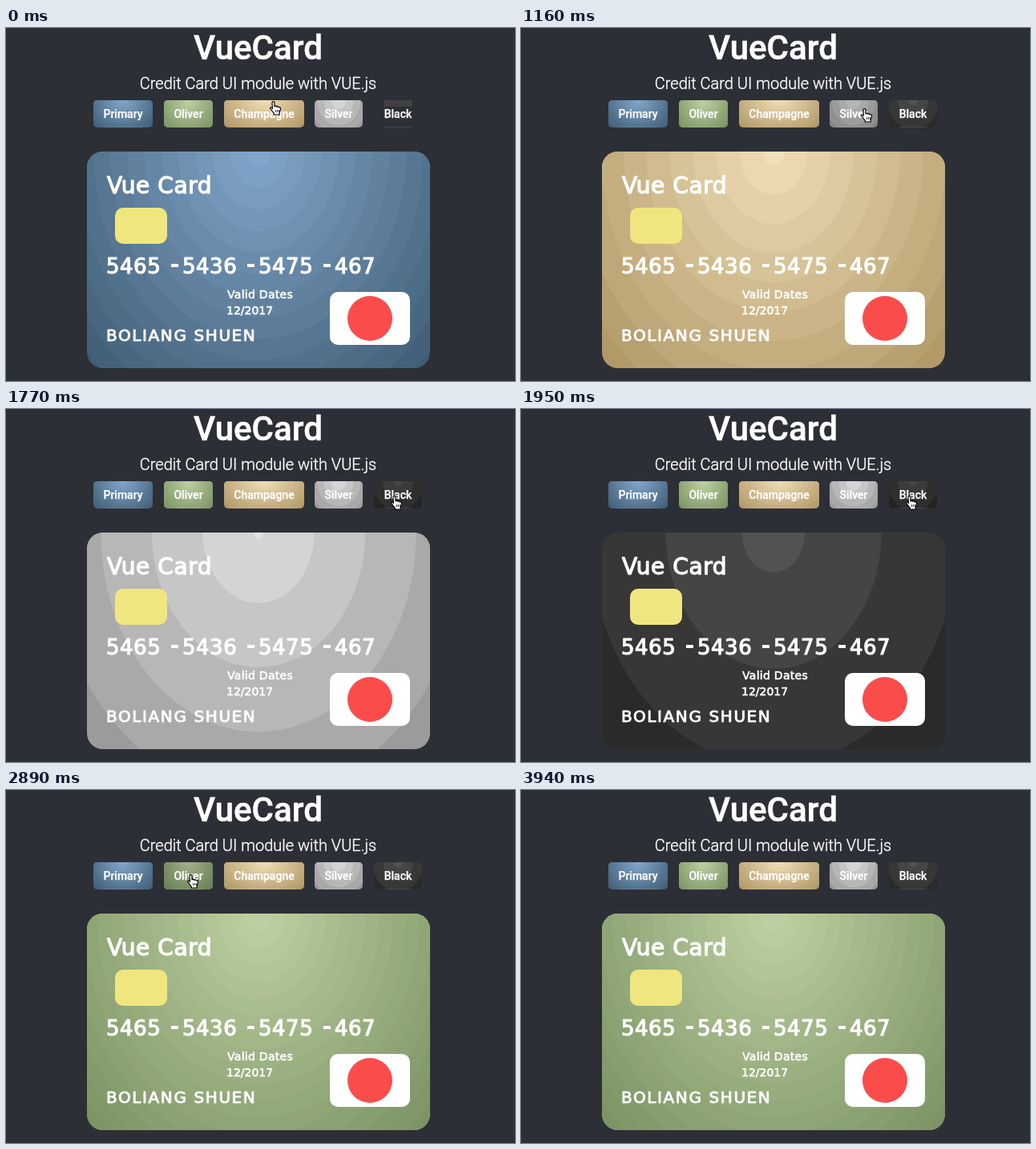
Animation, 635 px wide and 440 px high, one loop 4200 ms. Source, as an HTML page with a canvas:

```html
<!DOCTYPE html>
<html lang="en">
<head>
<meta charset="utf-8">
<title>VueCard</title>
<style>
  html, body { margin: 0; width: 100%; height: 100%; overflow: hidden; background: #2d2f36; }
  canvas { display: block; }
</style>
</head>
<body>
<canvas id="stage" width="635" height="440"></canvas>
<script>
const ctx = document.getElementById('stage').getContext('2d');
const LOOP = 4200;
const TICK = LOOP / 48;
const BG = '#2d2f36';
const UI = 'Roboto, sans-serif';
const CARD = '"DejaVu Sans", sans-serif';

// Card finishes: colours of a stepped radial gradient, first band edge and band width
const themes = {
  Primary:   { from: '#82a6cb', to: '#3f5c73', off: .05,  step: .07 },
  Oliver:    { from: '#bccfa1', to: '#789061', off: .06,  step: .055 },
  Champagne: { from: '#f1dfb8', to: '#b19968', off: .045, step: .0955 },
  Silver:    { from: '#e2e2e2', to: '#9b9b9b', off: .02,  step: .21 },
  Black:     { from: '#525252', to: '#2a2a2a', off: .13,  step: .315 }
};

// Pointer moves: when, where to, and how far the path arcs upwards
const home = { x: 329, y: 91 };
const moves = [
  { start: 0,    end: 175,  x: 316, y: 107, lift: 0 },
  { start: 525,  end: 1050, x: 424, y: 100, lift: 3 },
  { start: 1140, end: 1750, x: 480, y: 108, lift: 18 },
  { start: 1925, end: 2800, x: 226, y: 105, lift: 56 },
  { start: 3065, end: 3880, x: 615, y: 458, lift: 20 }
];

const picks = [
  { at: 0, name: 'Primary' },
  { at: 350, name: 'Champagne' },
  { at: 1225, name: 'Silver' },
  { at: 1925, name: 'Black' },
  { at: 2800, name: 'Oliver' }
];

const hand = new Path2D('M3 2.2Q3 .6 4.5 .6T6 2.2V7Q6.5 6 7.7 6.2T8.7 7.3Q9.4 6.6 10.4 6.9T11.3 8' +
  'Q12 7.6 12.9 8T13.5 9.8Q13.4 12.5 12.2 14.2V17H5.2V15.2Q3.5 13.2 2.3 11.5T.6 9.2Q.5 8 1.6 8T3.4 9.6Z');

const mix = (a, b, p) => a + (b - a) * p;
const ease = p => p * p * (3 - 2 * p);
const rgb = hex => [1, 3, 5].map(i => parseInt(hex.slice(i, i + 2), 16));

function pointerAt(t) {
  let { x, y } = home;
  for (const m of moves) {
    if (t <= m.start) break;
    const p = ease(Math.min(1, (t - m.start) / (m.end - m.start)));
    x = mix(x, m.x, p);
    y = mix(y, m.y, p) - m.lift * Math.sin(Math.PI * p);
  }
  return { x, y };
}

function box(x, y, w, h, r, fill) {
  ctx.beginPath();
  ctx.roundRect(x, y, w, h, r);
  ctx.fillStyle = fill;
  ctx.fill();
}

// Gradient spreads from the top centre to the far corners
function bands(x, y, w, h, r, { from, to, off, step }) {
  const n = Math.ceil((1 - off) / step);
  const end = rgb(to);
  const shade = i => `rgb(${rgb(from).map((c, j) => Math.round(mix(c, end[j], i / n)))})`;
  ctx.save();
  box(x, y, w, h, r, shade(n));
  ctx.clip();
  for (let i = n - 1; i >= 0; i--) {
    const t = (off + i * step) * Math.SQRT2;
    ctx.beginPath();
    ctx.ellipse(x + w / 2, y, t * w / 2, t * h, 0, 0, Math.PI * 2);
    ctx.fillStyle = shade(i);
    ctx.fill();
  }
  ctx.restore();
}

function text(str, x, y, font, weight, align = 'center') {
  ctx.font = font;
  ctx.textAlign = align;
  ctx.fillStyle = ctx.strokeStyle = '#fff';
  ctx.lineWidth = weight;
  ctx.lineJoin = 'round';
  ctx.fillText(str, x, y);
  ctx.strokeText(str, x, y);
}

function cardText(str, x, y, size, spacing = .02) {
  ctx.letterSpacing = size * spacing + 'px';
  text(str, x, y, `${size}px ${CARD}`, size * .045, 'left');
  ctx.letterSpacing = '0px';
}

function drawButtons(t, pointer) {
  const y = 90, h = 34, gap = 13.75, font = `500 14px ${UI}`;
  const px = pointer.x + 4.5, py = pointer.y;
  let left = 109;
  for (const [label, theme] of Object.entries(themes)) {
    ctx.font = font;
    const x = Math.round(left), w = Math.round(ctx.measureText(label).width + 25);
    if (label === 'Black' && t < picks[1].at) {
      // Not fully painted until the first click
      box(x + 12, y, w - 24, 8, 0, '#414141');
    } else {
      bands(x, y, w, h, 5, theme);
      const hover = px > x && px < x + w && py > y + 2 && py < y + h;
      if (hover) box(x, y, w, h, 5, 'rgba(0,0,0,.15)');
    }
    box(x + 12, y + h - 1, w - 24, 1, 0, 'rgba(255,255,255,.1)');
    text(label, x + w / 2, 112, font, .25);
    left += w + gap;
  }
}

function drawCard(theme) {
  bands(101, 154, 428, 270, 20, theme);
  cardText('Vue Card', 126, 206, 28);
  box(136, 224, 65, 45, 10, '#f0e67f');
  ['5465', '5436', '5475', '467'].forEach((part, i) => {
    const x = 125 + i * 95;
    cardText(part, x, 306, 26);
    if (i) box(x - 14, 294, 9, 4, 0, '#fff');
  });
  cardText('Valid Dates', 276, 337, 14);
  cardText('12/2017', 275, 357, 14, 0);
  cardText('BOLIANG SHUEN', 125, 390, 20, .08);
  box(404, 329, 100, 66, 10, '#fff');
  box(426, 334, 56, 56, 28, '#fb4c4c');
}

function drawPointer({ x, y }) {
  ctx.save();
  ctx.translate(x, y);
  ctx.fillStyle = '#fff';
  ctx.strokeStyle = '#000';
  ctx.lineWidth = 1.2;
  ctx.fill(hand);
  ctx.stroke(hand);
  for (let i = 0; i < 3; i++) box(7 + i * 2, 11, .8, 3, 0, '#000');
  ctx.restore();
}

function draw(ms) {
  const t = Math.floor(ms / TICK) * TICK;
  const pointer = pointerAt(t);
  ctx.fillStyle = BG;
  ctx.fillRect(0, 0, 635, 440);
  text('VueCard', 314.5, 39, `500 42px ${UI}`, .6);
  text('Credit Card UI module with VUE.js', 314.5, 76, `300 20px ${UI}`, .4);
  drawButtons(t, pointer);
  drawCard(themes[picks.findLast(p => p.at <= t).name]);
  drawPointer(pointer);
}

const start = performance.now();
function loop() {
  draw((performance.now() - start) % LOOP);
  requestAnimationFrame(loop);
}
loop();
</script>
</body>
</html>
```
